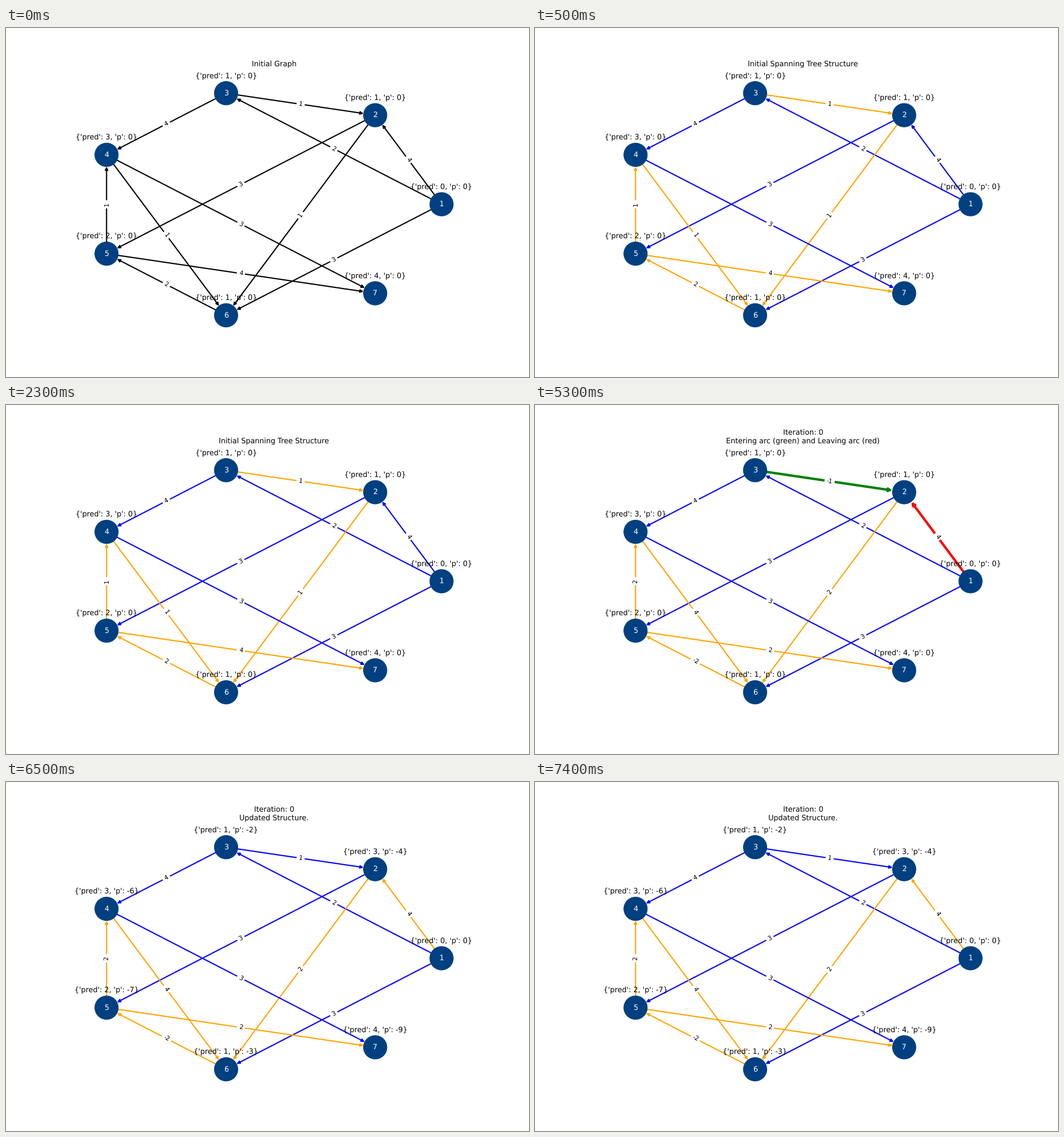
Write a matplotlib script that moves like this. It is 917x611 px and loops after 8 s.

```python
import math

import matplotlib.pyplot as plt
from matplotlib.animation import FuncAnimation
from matplotlib.patches import Circle, FancyArrowPatch

W, H, DPI = 917, 611, 100
PT = W / 1200  # drawing scale applied to all point sizes
RADIUS = math.sqrt(1500) / 2 * PT  # node radius in points
LABEL_RISE = 29.9
NAVY = "#004080"
STEP, LOOP = 500, 8000
NODES = range(1, 8)

plt.rcParams["font.family"] = "DejaVu Sans"
plt.rcParams["text.hinting"] = "none"


def fit(values, start, end):
    """Spread values between start and end with a 10% margin, applied twice."""
    lo, hi = min(values), max(values)
    scale = (end - start) / ((hi - lo) * 1.1 ** 2)
    return [(start + end) / 2 + (v - (lo + hi) / 2) * scale for v in values]


ANGLES = [2 * math.pi * (n - 1) / len(NODES) for n in NODES]
XS = fit([math.cos(a) for a in ANGLES], 0.125 * W, 0.9 * W)
YS = fit([math.sin(a) for a in ANGLES], 0.89 * H, 0.12 * H)
POS = dict(zip(NODES, zip(XS, YS)))

# Network simplex: spanning tree, potentials, reduced costs and one pivot
COST = {(1, 2): 4, (1, 3): 2, (1, 6): 3, (2, 5): 3, (2, 6): 1, (3, 2): 1,
        (3, 4): 4, (4, 6): 1, (4, 7): 3, (5, 4): 1, (5, 7): 4, (6, 5): 2}
PRED = {1: 0, 2: 1, 3: 1, 4: 3, 5: 2, 6: 1, 7: 4}
ZERO = dict.fromkeys(NODES, 0)
TREE = {(p, n) for n, p in PRED.items() if p}


def potential(n):
    p = PRED[n]
    return potential(p) - COST[p, n] if p else 0


P = {n: potential(n) for n in NODES}
REDUCED = {(i, j): c if (i, j) in TREE else c - P[i] + P[j]
           for (i, j), c in COST.items()}
ENTER = next(e for e in COST if REDUCED[e] < 0)
LEAVE = (PRED[ENTER[1]], ENTER[1])
NEW_TREE = TREE - {LEAVE} | {ENTER}
NEW_PRED = {**PRED, ENTER[1]: ENTER[0]}


def tree_colors(tree):
    return {e: "blue" if e in tree else "orange" for e in COST}


# start time, title, arc colours, arc costs, predecessors, potentials
STAGES = [
    (0, "Initial Graph", dict.fromkeys(COST, "black"), COST, PRED, ZERO),
    (500, "Initial Spanning Tree Structure", tree_colors(TREE),
     COST, PRED, ZERO),
    (3500, "Iteration: 0\nEntering arc (green) and Leaving arc (red)",
     {**tree_colors(TREE), ENTER: "green", LEAVE: "red"},
     REDUCED, PRED, ZERO),
    (6500, "Iteration: 0\nUpdated Structure.", tree_colors(NEW_TREE),
     {**REDUCED, ENTER: COST[ENTER]}, NEW_PRED, P),
]

fig = plt.figure(figsize=(W / DPI, H / DPI), dpi=DPI, facecolor="white")
ax = fig.add_axes([0, 0, 1, 1])


def label(x, y, text, size=12, **kw):
    kw = {"ha": "center", "va": "center", "zorder": 3, **kw}
    ax.text(x, y, text, fontsize=size * PT, **kw)


def draw_arc(edge, color):
    width = 4 if color in ("green", "red") else 2
    ax.add_patch(FancyArrowPatch(
        POS[edge[0]], POS[edge[1]], arrowstyle="-|>", color=color,
        mutation_scale=10 * PT, linewidth=width * PT,
        shrinkA=RADIUS, shrinkB=RADIUS, zorder=1))


def draw_cost(edge, cost):
    (x1, y1), (x2, y2) = POS[edge[0]], POS[edge[1]]
    angle = math.degrees(math.atan2(y1 - y2, x2 - x1))
    if abs(angle) > 90.01:  # keep the text upright
        angle -= math.copysign(180, angle)
    label((x1 + x2) / 2, (y1 + y2) / 2, str(cost), size=10,
          rotation=angle, zorder=1,
          bbox=dict(boxstyle="round", ec="white", fc="white", lw=PT))


def draw_node(n, pred, p):
    x, y = POS[n]
    ax.add_patch(Circle((x, y), RADIUS * DPI / 72, color=NAVY, lw=PT,
                        zorder=2))
    label(x, y, str(n), color="white")
    label(x, y - LABEL_RISE, str({"pred": pred, "p": p}))


def update(i):
    stage = [s for s in STAGES if s[0] <= i * STEP][-1]
    _, title, colors, costs, pred, p = stage
    ax.clear()
    ax.set(xlim=(0, W), ylim=(H, 0))
    ax.axis("off")
    for edge in COST:
        draw_arc(edge, colors[edge])
    for edge in COST:
        draw_cost(edge, costs[edge])
    for n in NODES:
        draw_node(n, pred[n], p[n])
    label(0.5125 * W, 0.12 * H - 6 * PT * DPI / 72, title, va="baseline")
    return []


anim = FuncAnimation(fig, update, frames=LOOP // STEP, interval=STEP,
                     repeat=True, repeat_delay=0, blit=False)
plt.show()
```
